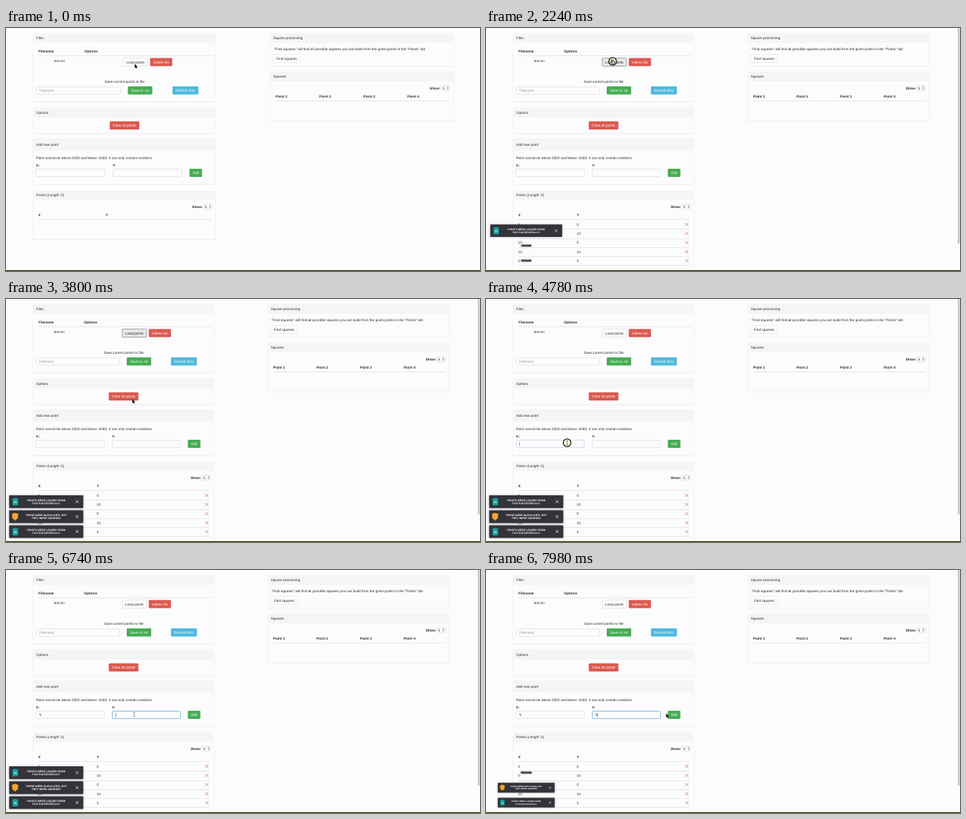
An HTML page with a canvas that plays this animation: 640 by 328 pixels, repeating every 8000 ms.

```html
<!DOCTYPE html>
<html lang="en">
<head>
<meta charset="utf-8">
<title>Squares</title>
<style>
  html, body { margin: 0; width: 100%; height: 100%; overflow: hidden; background: #fcfcfe; }
  canvas { display: block; width: 640px; height: 328px; }
</style>
</head>
<body>
<canvas width="640" height="328"></canvas>
<script>
const ctx = document.querySelector('canvas').getContext('2d');
const LOOP = 8000, LOADED = 1950, RELOADED = 2200;
const X_CLICK = 4750, Y_CLICK = 6350, X_TYPED = 5350, Y_TYPED = 7050;
const INK = '#2c2c2e', PAPER = '#fcfcfe', LINE = '#e6e6ea', HEADER = '#f5f5f5', FOCUS = '#86bfe6';
const GREEN = '#47ad54', BLUE = '#4fb9de', RED = '#dc5a50';

// time, x, y
const path = [
  [0, 174, 49], [500, 172, 45], [1380, 171, 45], [2300, 171, 45], [2800, 186, 121],
  [3500, 186, 121], [4550, 109.5, 194], [5250, 109.5, 194], [5950, 173, 195],
  [6900, 173, 195], [7450, 208.5, 195], [7650, 208.5, 195], [7980, 243.5, 194]
];
const toasts = [
  { from: LOADED, until: 7640, lines: ['POINTS WERE LOADED FROM', 'FILE SUCCESSFULLY!'] },
  { from: RELOADED, until: 7888, lines: ['THERE WERE DUPLICATES, BUT', 'THEY WERE IGNORED!'], warning: true },
  { from: RELOADED, until: 7888, lines: ['POINTS WERE LOADED FROM', 'FILE SUCCESSFULLY!'] }
];
const points = [[0, 0], [0, 10], [10, 0], [10, 10], [5, 5]];

let loaded = false;
// The scrollbar narrows the page once the points are listed.
const px = x => loaded ? 36 + (x - 36) * 0.99 : x;
const clamp = v => Math.max(0, Math.min(1, v));

function box(x, y, w, h, fill, stroke, r = 1) {
  ctx.beginPath();
  ctx.roundRect(x, y, w, h, r);
  if (fill) { ctx.fillStyle = fill; ctx.fill(); }
  if (stroke) { ctx.strokeStyle = stroke; ctx.lineWidth = 1; ctx.stroke(); }
}

function text(str, x, y, { bold, color = INK, size = 4.75, align = 'left' } = {}) {
  ctx.font = `${bold ? 'bold ' : ''}${size}px "Liberation Sans", Arial, sans-serif`;
  ctx.fillStyle = color;
  ctx.textAlign = align;
  ctx.fillText(str, x, y + size * 0.36);
}

const label = (str, x, y, style) => text(str, px(x), y, style);
const bold = (str, x, y) => label(str, x, y, { bold: true });

function polyline(coords, color, width, fill) {
  ctx.beginPath();
  coords.forEach(([x, y]) => ctx.lineTo(x, y));
  if (fill) { ctx.closePath(); ctx.fillStyle = fill; ctx.fill(); }
  ctx.strokeStyle = color;
  ctx.lineWidth = width;
  ctx.stroke();
}

function cross(x, y, r, color, width) {
  polyline([[x - r, y - r], [x + r, y + r]], color, width);
  polyline([[x - r, y + r], [x + r, y - r]], color, width);
}

function rule(x1, x2, y, color = LINE) {
  const left = Math.round(px(x1));
  ctx.fillStyle = color;
  ctx.fillRect(left, y, Math.round(px(x2)) - left, 1);
}

function panel(title, x1, x2, top, headerBottom, bottom) {
  const left = Math.round(px(x1)), width = Math.round(px(x2)) - left;
  box(left + .5, top + .5, width - 1, bottom - top, null, '#f3f3f6');
  ctx.fillStyle = HEADER;
  ctx.fillRect(left, top, width, headerBottom - top);
  rule(x1, x2, bottom, '#eeeef1');
  label(title, x1 + 4.8, (top + headerBottom) / 2);
}

function button(str, center, y, w, fill, stroke, color = '#fff') {
  box(px(center) - w / 2, y, w, 11, fill, stroke, 1.3);
  label(str, center, y + 5.6, { color, align: 'center' });
}

// focus runs from 0 to 1 while the border lights up
function input(x1, x2, y, value, focus, color) {
  const left = Math.round(px(x1)) + .5, width = Math.round(px(x2)) - left - .5;
  box(left, y + .5, width, 10, PAPER, LINE);
  label(value, x1 + 5, y + 5.7, { color });
  if (!focus) return;
  ctx.globalAlpha = focus;
  box(left, y + .5, width, 10, null, FOCUS);
  ctx.globalAlpha = 1;
  ctx.fillStyle = INK;
  ctx.fillRect(px(x1 + 5) + value.length * 2.7, y + 3.2, .5, 5);
}

function showSelect(x, y) {
  bold('Show:', x, y);
  const left = Math.round(px(x + 15));
  box(left + .5, y - 3.5, 12, 7, PAPER, LINE);
  text('5', left + 2.5, y);
  polyline([[left + 8.7, y - .8], [left + 9.5, y - 2], [left + 10.3, y - .8]], '#777', .4, '#777');
  polyline([[left + 8.7, y + .8], [left + 9.5, y + 2], [left + 10.3, y + .8]], '#777', .4, '#777');
}

function drawLeft(t) {
  panel('Files', 36, 283, 7, 20, 99);
  bold('Filename', 44, 31);
  bold('Options', 106, 31);
  rule(44, 280, 37);
  label('test.txt', 65, 44);
  const hover = t > 200 && t < 2450, focus = loaded && t < X_CLICK;
  const fill = hover || focus ? '#e6e6e6' : PAPER;
  button('Load points', 174.7, 40.5, 33, fill, focus ? '#a2a6ae' : hover ? '#c4c4c8' : LINE, INK);
  button('Delete file', 209.5, 40.5, 30, RED);
  label('Save current points to file', 160, 72, { align: 'center' });
  input(40, 155, 79, 'Filename', 0, '#98989c');
  button('Save to .txt', 181, 78.7, 33, GREEN);
  button('Refresh files', 242.3, 78.7, 35, BLUE);

  panel('Options', 36, 283, 107, 121, 142);
  button('Clear all points', 160, 126, 40, RED);

  panel('Add new point', 36, 283, 149, 165, 211);
  label('Point cannot be above 5000 and below -5000. It can only contain numbers.', 40.5, 175);
  bold('X:', 40.5, 185);
  bold('Y:', 144, 185);
  const inX = t < Y_CLICK ? clamp((t - X_CLICK) / 150) : 0;
  input(40, 134, 190, t > X_TYPED ? '5' : '', inX);
  input(144, 238, 190, t > Y_TYPED ? '5' : '', clamp((t - Y_CLICK) / 150));
  button('Add', 256.2, 190, 17, GREEN);

  panel(`Points (Length: ${loaded ? 5 : 0})`, 36, 283, 219, 232, loaded ? 330 : 285);
  showSelect(251.3, 241);
  bold('X', 43.5, 252);
  text('Y', loaded ? 122.5 : 134.5, 252, { bold: true });
  rule(44, 278, 258);
  if (!loaded) return;
  points.forEach(([x, y], i) => {
    const row = 265 + i * 12.3;
    text(x, 43.3, row);
    text(y, 122.5, row);
    cross(271, row, 2.2, '#dc6468', .7);
    rule(44, 278, Math.round(row + 6.2));
  });
}

function drawRight() {
  panel('Square processing', 356, 605, 7, 20, 51);
  label('"Find squares" will find all possible squares you can build from the given points in the "Points" tab', 361.8, 28.5);
  button('Find squares', 379, 35.5, 36, PAPER, '#ededf1', INK);
  panel('Squares', 356, 605, 59, 72, 125);
  showSelect(572, 81);
  [364, 423, 482.5, 542].forEach((x, i) => bold(`Point ${i + 1}`, x, 92));
  rule(364, 598, 98);
}

function drawToast({ from, until, lines, warning }, y, t) {
  const scale = clamp((t - from) / 300) * clamp(1 - (t - until) / 400);
  if (!scale) return;
  ctx.save();
  ctx.translate(54.3, y);
  ctx.scale(scale, scale);
  ctx.shadowColor = 'rgba(0,0,0,.35)';
  ctx.shadowBlur = 3;
  box(-50, -8.6, 100, 17.2, '#333338', null, .6);
  ctx.shadowBlur = 0;
  if (warning) {
    polyline([[-46, -3.5], [-42, -5], [-38, -3.5], [-38.5, 2], [-42, 5], [-45.5, 2]], '#f4a52a', .5, '#f4a52a');
  } else {
    box(-45.5, -4.5, 7.5, 9.5, '#12a3a0');
    box(-43, -5.2, 2.5, 1.4, '#12a3a0', null, .4);
    polyline([[-43, 2], [-43, 0], [-40.5, 0], [-40.5, 2]], '#e8fffc', .8);
  }
  lines.forEach((line, i) =>
    text(line, 0, i * 4.5 - 2.3, { bold: true, color: '#fff', size: 3.5, align: 'center' }));
  cross(41.7, 0, 1.9, '#fff', .7);
  ctx.restore();
}

function drawToasts(t) {
  const shown = toasts.filter(toast => t >= toast.from);
  shown.forEach((toast, i) => drawToast(toast, 314 - (shown.length - 1 - i) * 20.2, t));
}

function pointerAt(t) {
  const next = path.findIndex(p => p[0] > t);
  if (next < 0) return path.at(-1).slice(1);
  const [t0, x0, y0] = path[next - 1], [t1, x1, y1] = path[next];
  const u = (t - t0) / (t1 - t0), e = u * u * (3 - 2 * u);
  return [x0 + (x1 - x0) * e, y0 + (y1 - y0) * e];
}

function drawPointer(t) {
  const [x, y] = pointerAt(t);
  if ([LOADED, RELOADED, X_CLICK, Y_CLICK].some(c => t >= c - 40 && t < c + 180)) {
    ctx.beginPath();
    ctx.arc(x, y, 5.2, 0, Math.PI * 2);
    ctx.fillStyle = 'rgba(250,250,190,.5)';
    ctx.fill();
    ctx.strokeStyle = '#22220c';
    ctx.lineWidth = 1.3;
    ctx.stroke();
  }
  ctx.save();
  ctx.translate(x, y);
  const overInput = y > 190 && (x < 134 || x > 143 && x < 236);
  if (t > 200 && t < 2450) {
    box(-2, -.5, 4.5, 4, '#fff', '#333', 1.2);
    box(-1.6, -2.5, 1.4, 4, '#fff', '#333', .7);
  } else if (overInput) {
    polyline([[-1.2, -2.6], [1.2, -2.6]], '#444', .5);
    polyline([[0, -2.6], [0, 2.6]], '#444', .6);
    polyline([[-1.2, 2.6], [1.2, 2.6]], '#444', .5);
  } else {
    polyline([[0, 0], [0, 4.6], [1.1, 3.7], [1.9, 5.4], [2.7, 5], [1.9, 3.4], [3.2, 3.3]], '#111', .5, '#111');
  }
  ctx.restore();
}

function draw(now) {
  const t = now % LOOP;
  loaded = t >= LOADED;
  ctx.textRendering = 'geometricPrecision';
  ctx.fillStyle = PAPER;
  ctx.fillRect(0, 0, 640, 328);
  drawLeft(t);
  drawRight();
  if (loaded) box(637, 0, 2.5, 291, '#c6c6ca');
  ctx.fillStyle = '#f4f4c8';
  ctx.fillRect(0, 326, 640, 1);
  ctx.fillStyle = '#26260a';
  ctx.fillRect(0, 327, 640, 1);
  drawToasts(t);
  drawPointer(t);
  requestAnimationFrame(draw);
}
requestAnimationFrame(draw);
</script>
</body>
</html>
```
